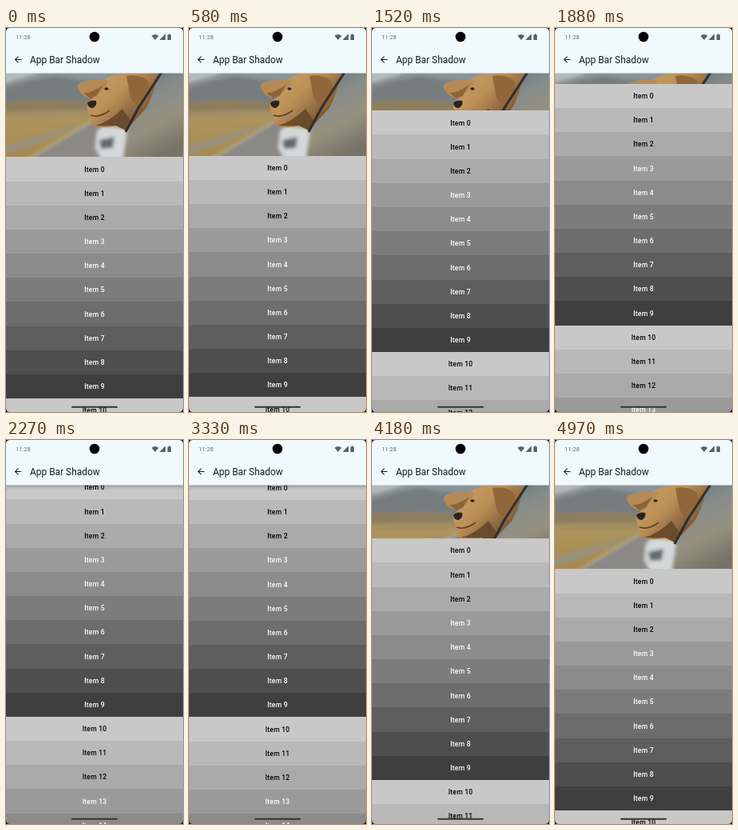
Write an HTML page that moves like this. It is 222 px wide and 480 px high and loops after 5 s.

```html
<!DOCTYPE html>
<html lang="en">
<head>
<meta charset="utf-8">
<title>App Bar Shadow</title>
<style>
  html, body { margin: 0; width: 100%; height: 100%; overflow: hidden; background: #000; }
  svg { display: block; width: 100%; height: 100%; }
  text { font-family: Roboto, sans-serif; }
  .item { font-size: 8.62px; font-weight: 500; letter-spacing: .2px; text-anchor: middle; }
</style>
</head>
<body>
<svg viewBox="0 0 222 480" xmlns="http://www.w3.org/2000/svg">
  <defs>
    <linearGradient id="land" x2="0" y2="1">
      <stop offset="0" stop-color="#8f979a"/>
      <stop offset=".28" stop-color="#7d8180"/>
      <stop offset=".38" stop-color="#92866a"/>
      <stop offset=".55" stop-color="#ae945c"/>
      <stop offset="1" stop-color="#a5894f"/>
    </linearGradient>
    <linearGradient id="fur" x2="1" y2=".8">
      <stop offset="0" stop-color="#c99f63"/>
      <stop offset=".45" stop-color="#bd9058"/>
      <stop offset="1" stop-color="#5f4229"/>
    </linearGradient>
    <linearGradient id="glass" x2=".4" y2="1">
      <stop offset="0" stop-color="#59666c"/>
      <stop offset=".4" stop-color="#858c8b"/>
      <stop offset=".7" stop-color="#97917f"/>
      <stop offset="1" stop-color="#777367"/>
    </linearGradient>
    <linearGradient id="fade" x2="0" y2="1">
      <stop offset="0" stop-opacity=".3"/>
      <stop offset=".4" stop-opacity=".1"/>
      <stop offset="1" stop-opacity="0"/>
    </linearGradient>
    <filter id="soft" x="-10%" y="-10%" width="120%" height="120%"><feGaussianBlur stdDeviation="2.2"/></filter>
    <filter id="fine"><feGaussianBlur stdDeviation=".6"/></filter>
  </defs>

  <g transform="translate(0 56)">
    <rect width="222" height="107" fill="url(#land)"/>
    <g filter="url(#soft)">
      <path d="M-5-5H50L30 4-5 14Z" fill="#b4babc"/>
      <path d="M-5 22L30 10 60 4 110 12V36L60 33-5 36Z" fill="#767d7f"/>
      <path d="M-5 36L50 33 110 38V45L-5 48Z" fill="#8d7d5c"/>
      <path d="M108 60L20 112H135L128 60Z" fill="#8a8986"/>
      <path d="M108 59L-5 92V102L30 92Z" fill="#98917f"/>
      <path d="M108 61L24 110" stroke="#bdb8a8" stroke-width="2"/>
      <path d="M178-5H230V112H140L152 70Z" fill="url(#glass)"/>
      <path d="M114 74Q118 66 130 67L152 70 146 112H122L112 94Z" fill="#d5d8d9"/>
      <path d="M117 84L136 80 134 94 119 95Z" fill="#64696c"/>
    </g>
    <g filter="url(#fine)">
      <path d="M122 9Q133 1 150 0L190-2Q188 22 176 44L152 70Q143 64 138 66Q124 70 110 66Q104 62 105 53Q101 45 102 39Q106 32 114 29Z" fill="url(#fur)"/>
      <path d="M128 9Q112 7 97 11Q88 13 90 19Q95 30 106 32Q115 28 126 17Z" fill="#b58a55"/>
      <path d="M97 25Q106 26 122 15L114 28 106 32Z" fill="#8d6438"/>
      <path d="M151 4Q168 1 178 10Q183 26 173 44Q162 43 156 30Z" fill="#91663b"/>
      <path d="M112 66Q130 61 146 45L158 62 150 72 138 66Z" fill="#6b4b2e"/>
      <path d="M102 38Q106 33 113 35Q115 40 109 44Q103 44 102 38Z" fill="#2b2320"/>
      <path d="M106 53Q117 57 130 47" fill="none" stroke="#5f432b" stroke-width="1.6"/>
      <ellipse cx="126" cy="20" rx="2.6" ry="1.7" fill="#33231a"/>
      <path d="M196-2L166 44 150 74" fill="none" stroke="#2d3134" stroke-width="3.2"/>
    </g>
  </g>
  <g id="list" shape-rendering="crispEdges"></g>

  <rect id="shadow" y="56" width="222" height="7" fill="url(#fade)"/>
  <rect width="222" height="56.5" fill="#eff9fe"/>
  <text x="12" y="14.2" font-size="7.54" fill="#6a7074">11:28</text>
  <circle cx="111" cy="11" r="6.3"/>
  <g fill="#5a6064">
    <path d="M182.6 9.7Q187 6.3 191.4 9.7L187 15Z"/>
    <path d="M200 7.3V15H192.6Z"/>
    <path d="M202.6 8.6H203.8V7.6H205.8V8.6H207V15H202.6Z"/>
  </g>
  <path transform="translate(8.6 33) scale(.5388)" fill="#171c1f" d="M20 11H7.83l5.59-5.59L12 4l-8 8 8 8 1.41-1.41L7.83 13H20z"/>
  <text x="30" y="43.7" font-size="11.95" fill="#171c1f">App Bar Shadow</text>
  <rect x="82" y="472.7" width="58" height="2.1" rx="1" fill="#343434"/>
  <path fill-rule="evenodd" d="M0 0H222V480H0ZM5 0Q0 0 0 5V475Q0 480 5 480H217Q222 480 222 475V5Q222 0 217 0Z"/>
</svg>
<script>
const LOOP = 5000, ROW = 30.17, LIST_TOP = 161.4, PHOTO_H = 105;
const $ = id => document.getElementById(id);

function add(parent, tag, attrs, label = '') {
  const el = document.createElementNS('http://www.w3.org/2000/svg', tag);
  for (const key in attrs) el.setAttribute(key, attrs[key]);
  el.textContent = label;
  parent.append(el);
}

for (let i = 0; i < 16; i++) {
  const shade = Math.round(200 - 15.2 * (i % 10));
  add($('list'), 'rect', { y: i * ROW, width: 222, height: ROW, fill: `rgb(${shade},${shade},${shade})` });
  add($('list'), 'text', { class: 'item', x: 111, y: i * ROW + 18.2, fill: i % 10 < 3 ? '#000' : '#fff' }, 'Item ' + i);
}

// Drag path: time in ms, scroll in px, speed in px per ms
const drag = [
  [400, 0, 0], [1060, 23, .07], [1520, 58, .081], [2270, 117.2, .025],
  [2270, 117.2, 0], [3300, 117.2, 0], [3330, 116.7, -.03], [4180, 38.2, -.093], [4970, 0, 0]
];

function scrollAt(t) {
  const next = drag.findIndex(k => t < k[0]);
  if (next <= 0) return 0;
  const [t0, p0, v0] = drag[next - 1], [t1, p1, v1] = drag[next];
  const d = t1 - t0, u = (t - t0) / d, w = 1 - u;
  return w * w * ((1 + 2 * u) * p0 + u * d * v0) + u * u * ((3 - 2 * u) * p1 - w * d * v1);
}

// The list slides up over the pinned photo; the bar casts a shadow once the photo is covered
function draw(t) {
  const s = scrollAt(t);
  $('list').setAttribute('transform', `translate(0 ${LIST_TOP - s})`);
  $('shadow').setAttribute('opacity', Math.min(1, Math.max(0, (s - PHOTO_H) / 3)));
}

const start = performance.now();
function tick() {
  draw((performance.now() - start) % LOOP);
  requestAnimationFrame(tick);
}
tick();
</script>
</body>
</html>
```
